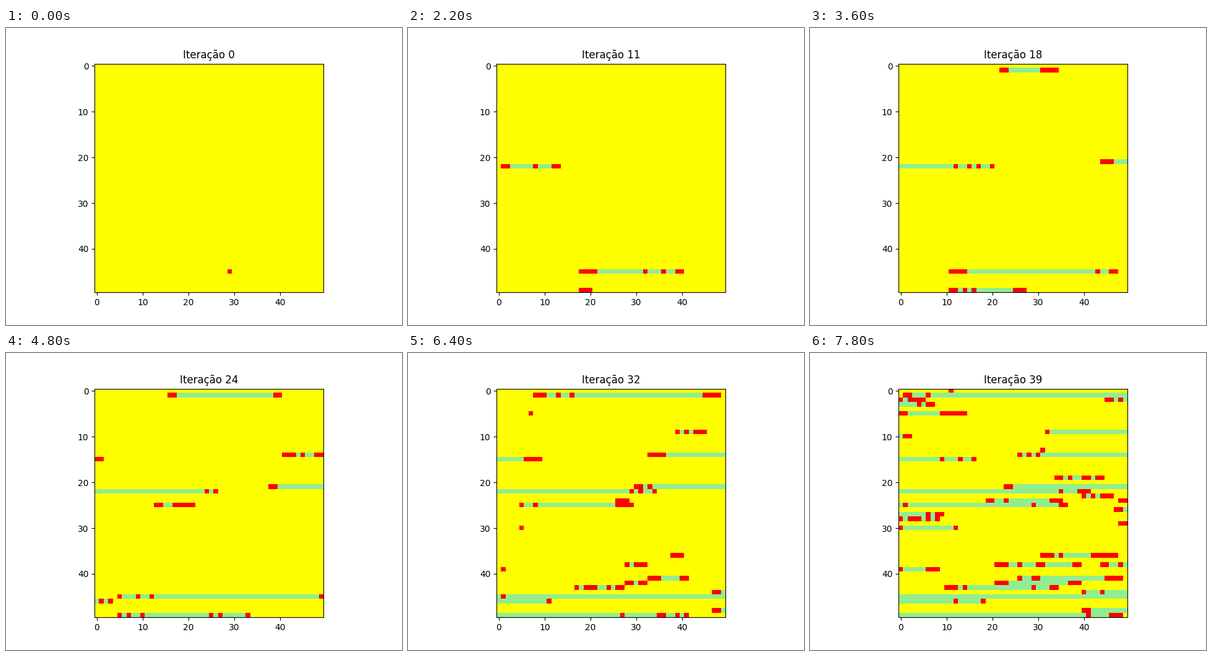
These frames come from a looping animation (640 px wide and 480 px high, 8000 ms). A matplotlib script:

```python
import matplotlib.pyplot as plt
import numpy as np
from matplotlib.animation import FuncAnimation
from matplotlib.colors import ListedColormap

SIZE = 50
STEPS = 40
HEAL_CHANCE = 0.3

# (row, column, step) of each first case
CASES = [
    (45, 29, 0), (22, 7, 5), (49, 19, 10), (1, 28, 12), (14, 46, 19),
    (25, 17, 20), (43, 22, 27), (41, 37, 28), (9, 42, 29), (38, 30, 30),
    (42, 30, 30), (24, 27, 31), (36, 39, 31), (5, 7, 32), (30, 5, 32),
    (39, 1, 32), (3, 1, 33), (27, 3, 33), (19, 39, 34), (28, 4, 35),
    (23, 43, 36), (0, 11, 39), (13, 31, 39),
]

# The grid is one long line of cells, read row by row; every case spreads
# one cell per step both ways, and each cell heals after a random wait.
rng = np.random.default_rng(4)
cells = np.arange(SIZE * SIZE)
caught = np.min([start + abs(cells - (row * SIZE + col))
                 for row, col, start in CASES], axis=0)
healed = caught + rng.geometric(HEAL_CHANCE, cells.size)


def grid(step):
    """0 healthy, 1 ill, 2 recovered."""
    state = (step >= caught).astype(int) + (step >= healed)
    return state.reshape(SIZE, SIZE)


fig, ax = plt.subplots(figsize=(6.4, 4.8), dpi=100)
cmap = ListedColormap(["yellow", "red", "lightgreen"])
image = ax.imshow(grid(0), cmap=cmap, vmin=0, vmax=2)
title = ax.set_title("Iteração 0")


def update(step):
    image.set_data(grid(step))
    title.set_text(f"Iteração {step}")
    return image, title


anim = FuncAnimation(fig, update, frames=STEPS, interval=200,
                     repeat=True, repeat_delay=0, blit=False)
plt.show()
```
